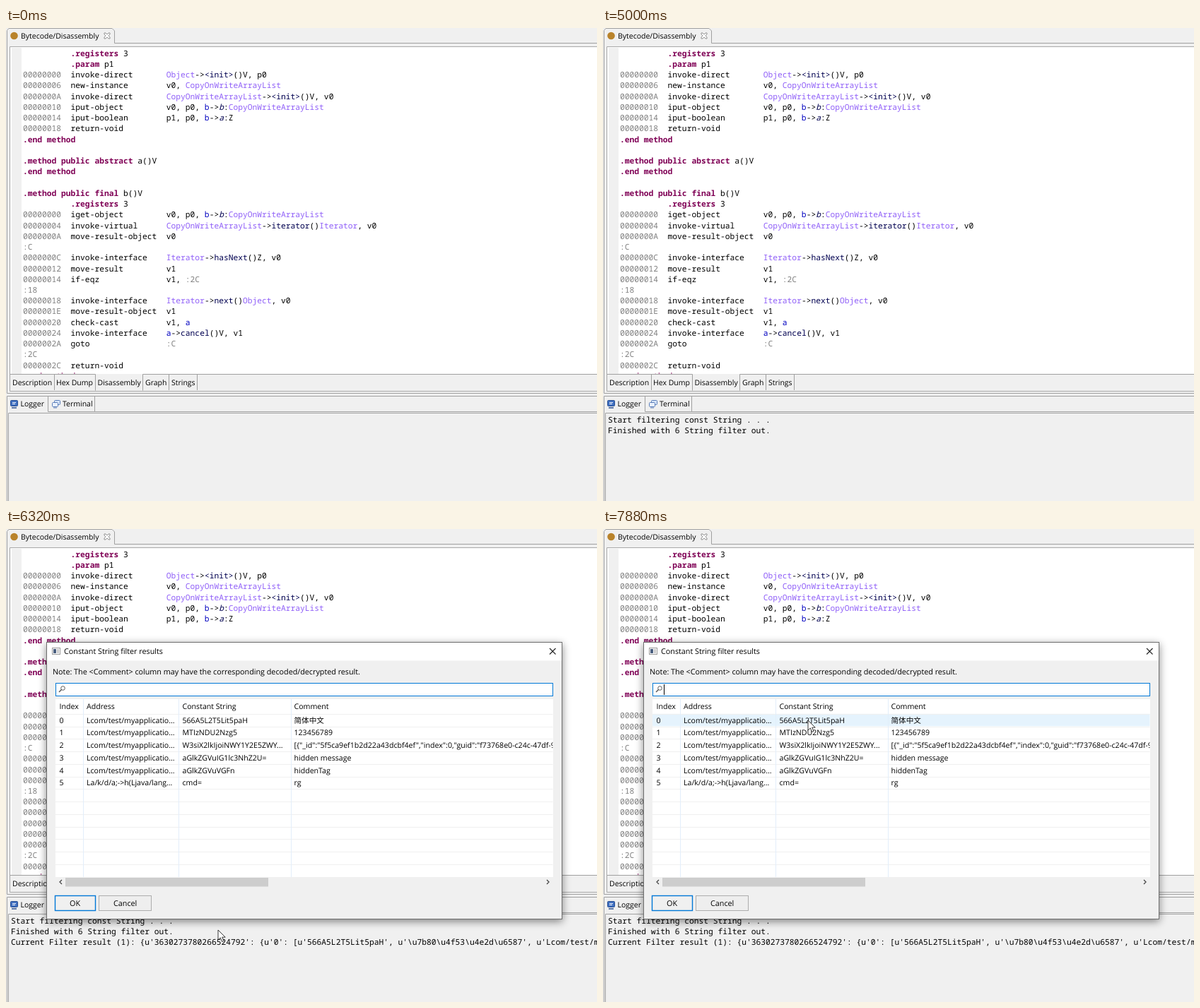
An HTML page that plays this animation: 836x670 px, repeating every 8000 ms.

```html
<!DOCTYPE html>
<html lang="en">
<head>
<meta charset="utf-8">
<title>Filter results</title>
<style>
html, body { margin: 0; width: 100%; height: 100%; overflow: hidden; background: #f0f0f0; }
svg { display: block; }
text { font: 10.5px "Open Sans", "Noto Sans", "Noto Sans CJK SC", sans-serif; white-space: pre; text-rendering: geometricPrecision; }
#dialog text { font-size: 10.78px; }
#table text { font-size: 10.6px; }
.mono { font: 11.28px "Noto Sans Mono", "DejaVu Sans Mono", monospace; }
.key { fill: #7f0055; font-weight: bold; }
.dim { fill: #808080; }
.type { fill: #9060f8; }
.ref { fill: #0000c0; }
.name { fill: #000050; }
.field { fill: #000050; font-style: italic; }
</style>
</head>
<body>
<svg id="stage" width="836" height="670" viewBox="0 0 836 670">
  <defs>
    <clipPath id="codeClip"><rect x="6" y="27" width="830" height="462.5"/></clipPath>
    <clipPath id="tableClip"><rect x="70" y="241" width="703.5" height="252"/></clipPath>
  </defs>
  <rect width="836" height="670" fill="#f0f0f0"/>

  <!-- editor -->
  <g fill="none" stroke="#a0a0a0">
    <path d="M1.5 517.5V3.5L4 .5H150L153.5 4V21.5H836M1.5 517.5H836"/>
    <path d="M836 26.5H5.5V514.5H836" stroke="#a8a8a8"/>
  </g>
  <rect x="6" y="27" width="830" height="463" fill="#fff"/>
  <rect x="8" y="28" width="14" height="462" fill="#f0f0f0"/>
  <circle cx="11.5" cy="11" r="5.3" fill="#b9832b"/>
  <path d="M139 7h2l2 2 2-2h2v2l-2 2 2 2v2h-2l-2-2-2 2h-2v-2l2-2-2-2z" fill="#fff" stroke="#777" stroke-width=".8"/>
  <g id="code" clip-path="url(#codeClip)"></g>
  <path d="M6 490.5H126.5V513.5M193.5 513.5V490.5H836M68.5 491V513M230.5 491V513M270.5 491V513" fill="none" stroke="#a0a0a0"/>

  <!-- log panel -->
  <path d="M1.5 670V521.5H836M59.5 522V543.5H836M125.5 522V543M3.5 670V545.5H836" fill="none" stroke="#a0a0a0"/>
  <g stroke="#2a4f91">
    <rect x="6.5" y="527.5" width="10" height="8" rx="1" fill="#3f6fc0"/>
    <path d="M9 530.5h5M9 532.5h4" stroke="#fff"/>
    <path d="M8 538h7" stroke-width="1.5"/>
    <rect x="68.5" y="527.5" width="8" height="6" rx="1" fill="#d8e6fa" stroke="#5a7db8"/>
    <rect x="65.5" y="530.5" width="8" height="6" rx="1" fill="#e8f0fc" stroke="#5a7db8"/>
    <path d="M67 538h5" stroke="#5a7db8"/>
  </g>
  <g id="labels"></g>
  <g id="log"></g>
  <path id="logCaret" d="M7.5 547V563" stroke="#000"/>

  <g id="dialog">
    <rect x="57.5" y="160.5" width="729" height="392" fill="#f0f0f0" stroke="#6e6e6e" style="filter:drop-shadow(0 3px 6px #0007)"/>
    <rect x="58" y="161" width="728" height="25.5" fill="#fff"/>
    <rect x="65.5" y="168.5" width="11" height="9" fill="#fff" stroke="#999"/>
    <path d="M67 170h4v6h-4z" fill="#4a5f80"/>
    <path d="M72 170h3v6h-3z" fill="#ccc"/>
    <path d="M769 169l8.5 8.5M777.5 169l-8.5 8.5" stroke="#222" stroke-width="1.1"/>
    <rect x="70.5" y="218.5" width="703" height="18" fill="#fff" stroke="#0078d7"/>
    <g fill="none" stroke="#555"><circle cx="80.5" cy="225.5" r="2.8"/><path d="M78.5 227.5l-3.5 3.5" stroke-width="1.4"/></g>
    <path id="findCaret" d="M86.5 220V235" stroke="#000"/>
    <rect x="70" y="241" width="704" height="252" fill="#fff"/>
    <rect id="hover" x="70" width="703.5" height="17.5" fill="#e5f3fd"/>
    <g id="table" clip-path="url(#tableClip)"></g>
    <rect x="84" y="494" width="287" height="12.5" fill="#cdcdcd"/>
    <path d="M79 497l-3 3 3 3M765 497l3 3-3 3" fill="none" stroke="#444" stroke-width="1.3"/>
    <rect x="69.5" y="519.5" width="57" height="21" fill="#f0f0f0" stroke="#0078d7" stroke-width="1.4"/>
    <rect x="131.5" y="519.5" width="74" height="21" fill="#eee" stroke="#adadad"/>
  </g>
  <path id="pointer" d="M0 0V14L3.3 11 5.6 16.5 8 15.5 5.7 10.2H10.2Z" fill="#fff" stroke="#222" stroke-width=".9"/>
</svg>
<script>
const $ = id => document.getElementById(id);

function add(parent, tag, attrs, content = "") {
  const el = document.createElementNS("http://www.w3.org/2000/svg", tag);
  for (const k in attrs) el.setAttribute(k, attrs[k]);
  el.innerHTML = content;
  return parent.appendChild(el);
}
const esc = s => s.replace(/&/g, "&amp;").replace(/</g, "&lt;").replace(/>/g, "&gt;");
// y is the vertical middle of the text line
const label = (parent, x, y, s, cls = "") => add(parent, "text", { x, y: y + 3.9, class: cls }, esc(s));

const rules = [
  ["key", /\.(?:end method|method public \w+|registers|param)/],
  ["dim", /^[0-9A-F]{8}|(?<=^|\s):\w+/],
  ["type", /CopyOnWriteArrayList|Iterator|Object/],
  ["field", /(?<=->)\w(?=:)/],
  ["name", /(?<=->)(?:<init>|\w+)/],
  ["ref", /\b[ab](?=->)|(?<=v1, )a$/]
];
const lexer = new RegExp(rules.map(([n, r]) => `(?<${n}>${r.source})`).join("|"), "g");

function paint(line) {
  let out = "", last = 0;
  for (const m of line.matchAll(lexer)) {
    const cls = rules.find(([n]) => m.groups[n] !== undefined)[0];
    out += esc(line.slice(last, m.index)) + `<tspan class="${cls}">${esc(m[0])}</tspan>`;
    last = m.index + m[0].length;
  }
  return out + esc(line.slice(last));
}

// address|instruction|operands, or a plain line
const code = `|.registers 3
|.param p1
00|invoke-direct|Object-><init>()V, p0
06|new-instance|v0, CopyOnWriteArrayList
0A|invoke-direct|CopyOnWriteArrayList-><init>()V, v0
10|iput-object|v0, p0, b->b:CopyOnWriteArrayList
14|iput-boolean|p1, p0, b->a:Z
18|return-void
.end method

.method public abstract a()V
.end method

.method public final b()V
|.registers 3
00|iget-object|v0, p0, b->b:CopyOnWriteArrayList
04|invoke-virtual|CopyOnWriteArrayList->iterator()Iterator, v0
0A|move-result-object|v0
:C
0C|invoke-interface|Iterator->hasNext()Z, v0
12|move-result|v1
14|if-eqz|v1, :2C
:18
18|invoke-interface|Iterator->next()Object, v0
1E|move-result-object|v1
20|check-cast|v1, a
24|invoke-interface|a->cancel()V, v1
2A|goto|:C
:2C
2C|return-void
.end method`;
code.split("\n").forEach((row, i) => {
  const [addr, op, args = ""] = row.split("|");
  const line = op === undefined ? addr
    : ((addr && "000000" + addr).padEnd(10) + op).padEnd(args ? 30 : 0) + args;
  add($("code"), "text", { x: 24, y: 39.7 + i * 15.24, class: "mono" }, paint(line));
});

[[21, 11, "Bytecode/Disassembly"], [9, 502.5, "Description"], [71, 502.5, "Hex Dump"],
 [129.5, 502.5, "Disassembly"], [197, 502.5, "Graph"], [234, 502.5, "Strings"],
 [20.5, 532.5, "Logger"], [80, 532.5, "Terminal"]].forEach(a => label($("labels"), ...a));

const logLines = [
  [2390, "Start filtering const String . . ."],
  [2600, "Finished with 6 String filter out."],
  [5450, "Current Filter result (1): {u'3630273780266524792': {u'0': [u'566A5L2T5Lit5paH', u'\\u7b80\\u4f53\\u4e2d\\u6587', u'Lcom/test/my"]
].map(([at, s], i) => ({ at, el: label($("log"), 7, 555 + i * 15.25, s, "mono") }));

const dialog = $("dialog"), table = $("table");
[[82, 173, "Constant String filter results"],
 [66, 202, "Note: The <Comment> column may have the corresponding decoded/decrypted result."],
 [90, 530, "OK"], [152, 530, "Cancel"]].forEach(a => label(dialog, ...a));

const top0 = 261.8, pitch = 17.75, cols = [75.5, 114, 249.5, 407.5];
const app = "Lcom/test/myapplicatio...";
for (let i = 0; i < 13; i++)
  add(table, "path", { d: `M70 ${Math.round(top0 + i * pitch) + .5}H774`, stroke: "#f0f0f0" });
for (const x of [109, 244, 403])
  add(table, "path", { d: `M${x + .5} 241V493`, stroke: "#e2eefa" });
[["Index", "Address", "Constant String", "Comment"],
 [0, app, "566A5L2T5Lit5paH", "简体中文"],
 [1, app, "MTIzNDU2Nzg5", "123456789"],
 [2, app, "W3siX2lkIjoiNWY1Y2E5ZWY...", '[{"_id":"5f5ca9ef1b2d22a43dcbf4ef","index":0,"guid":"f73768e0-c24c-47df-9b2e'],
 [3, app, "aGlkZGVuIG1lc3NhZ2U=", "hidden message"],
 [4, app, "aGlkZGVuVGFn", "hiddenTag"],
 [5, "La/k/d/a;->h(Ljava/lang...", "cmd=", "rg"]
].forEach((row, i) => row.forEach((s, c) =>
  label(table, cols[c], i ? 270.8 + (i - 1) * pitch : 251.5, String(s))));

const within = (t, spans) => spans.some(([a, b]) => t >= a && t < b);
const show = (el, on) => { el.style.display = on ? "" : "none"; };

// the pointer is sampled at these times along its path
const ticks = [6320, 6440, 6560, 6660, 6760, 6880, 6980, 7100, 7220, 7340, 7440, 7560, 7660, 7760, 7880];
const path = [[6320, 300, 568], [6660, 289, 342], [7100, 261, 314], [7880, 290, 271]];

function pointerAt(t) {
  const now = ticks.filter(k => k <= t).pop();
  if (!now) return null;
  const i = Math.max(1, path.findIndex(p => p[0] >= now));
  const [a, b] = [path[i - 1], path[i]];
  const k = (now - a[0]) / (b[0] - a[0]);
  return [1, 2].map(n => Math.round(a[n] + (b[n] - a[n]) * k));
}

function draw(t) {
  logLines.forEach(l => show(l.el, t >= l.at));
  show($("logCaret"), within(t, [[310, 860], [1410, 1840], [2290, 3150], [3700, 4130], [4680, 5000]]));

  const opening = t < 5670;
  show(dialog, t >= 5550);
  dialog.setAttribute("opacity", opening ? .91 : 1);
  dialog.setAttribute("transform", opening ? "translate(422 356.5) scale(.9945) translate(-422 -356.5)" : "");
  show($("findCaret"), within(t, [[5550, 6100], [6660, 7220], [7760, 8000]]));

  const pos = pointerAt(t);
  const row = pos ? Math.floor((pos[1] - top0) / pitch) : -1;
  show($("pointer"), pos);
  show($("hover"), row >= 0 && row < 6);
  $("hover").setAttribute("y", top0 + row * pitch);
  if (pos) $("pointer").setAttribute("transform", `translate(${pos})`);
}

const start = performance.now();
function loop() {
  draw((performance.now() - start) % 8000);
  requestAnimationFrame(loop);
}
loop();
</script>
</body>
</html>
```
